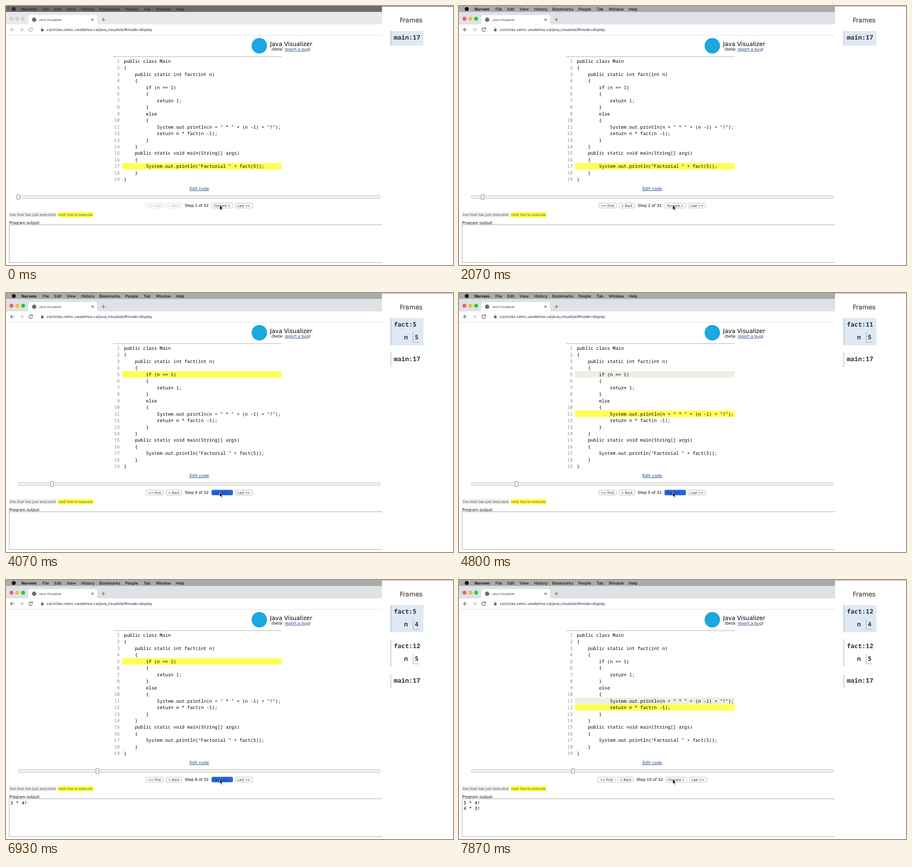
An HTML page that plays this animation: 982x570 px, repeating every 8 s.

```html
<!DOCTYPE html>
<html lang="en">
<head>
<meta charset="utf-8">
<title>Java Visualizer</title>
<style>
  html, body { margin: 0; width: 100%; height: 100%; overflow: hidden; background: #fff; }
  svg { display: block; width: 100%; height: 100%; font-family: "DejaVu Sans", sans-serif; }
  text { white-space: pre; text-rendering: geometricPrecision; }
  .ui { font-family: Inter, sans-serif; }
  .mono { font-family: "Noto Sans Mono", monospace; font-size: 10.08px; }
  .menu { font-size: 8.6px; }
  .num { fill: #888; text-anchor: end; }
  .btn { font-size: 6.95px; text-anchor: middle; fill: #222; }
  .btn rect { fill: #fdfdfd; stroke: #b8b8b8; }
  .btn.off { fill: #aaa; }
  .btn.off rect { stroke: #ddd; }
  .btn.down { fill: #0b2a70; }
  .btn.down rect { fill: #2468e2; stroke: #1c56c4; }
  .link { fill: #1f3f86; text-decoration: underline; }
  .stack { font-family: "Noto Sans Mono", monospace; font-size: 13.8px; font-weight: 600; fill: #333; }
  .line { fill: none; stroke: #a4a4a4; }
  .icon { fill: none; stroke: #555; stroke-width: 1.2; }
</style>
</head>
<body>
<svg viewBox="0 0 982 570" preserveAspectRatio="none">
  <rect width="982" height="570" fill="#fff"/>

  <g class="ui">
    <rect id="menuBar" width="982" height="13"/>
    <g id="menu" class="menu"><circle cx="17" cy="6.6" r="4.4"/></g>
    <rect id="tabBar" y="13" width="826" height="27.5"/>
    <g id="lights"></g>
    <path d="M45 40.5q4 0 4-4V24q0-4 4-4H196q4 0 4 4V36.500q0 4 4 4z" fill="#fff"/>
    <circle cx="62" cy="30" r="4.600" fill="#474a4e"/>
    <path d="M59 28l2.500 1.500-1 2M63 26.500l1 2 2 .5M62.500 33l1.500-2" fill="none" stroke="#fff" stroke-width=".9"/>
    <text x="72" y="32.700" font-size="7.100" fill="#3c4043">Java Visualizer</text>
    <path class="icon" d="M187.800 27.800l4.600 4.600m0-4.600l-4.600 4.600M210.300 30h7.600m-3.800-3.800v7.600"/>
    <path d="M0 64.500H826" stroke="#dcdee1"/>
    <path id="back" class="icon" d="M18.300 52h-8.300m4-4l-4 4 4 4"/>
    <path class="icon" style="stroke:#b5b7ba" d="M29.500 52h8.300m-4-4l4 4-4 4"/>
    <path id="reload" class="icon" d="M57.600 50a3.900 3.900 0 1 0 .4 3.200M58.300 47.600v2.900h-2.900"/>
    <rect x="77" y="51" width="5.400" height="4.600" rx=".6" fill="#55585c"/>
    <path class="icon" style="stroke-width:.9" d="M78.200 51v-1.300a1.500 1.500 0 0 1 3 0V51"/>
    <text x="89.500" y="55" font-size="8.300" fill="#2a2c30">cscircles.cemc.uwaterloo.ca/java_visualize/#mode=display</text>
  </g>

  <circle cx="556.500" cy="87.500" r="17" fill="#1ca6e2"/>
  <text x="580" y="87.600" font-size="12.800">Java Visualizer</text>
  <text x="583.500" y="98.300" font-size="8.650" font-style="italic">(beta: <tspan class="link" font-style="normal">report a bug</tspan>)</text>

  <path d="M235 111.500H605.500" stroke="#aaa"/>
  <rect id="done" x="255" width="350.500" height="14.300" fill="#eeeee7"/>
  <rect id="next" x="255" width="350.500" height="14.300" fill="#ffff55"/>
  <g id="code" class="mono"></g>

  <text class="link" x="403" y="405" font-size="9.200">Edit code</text>
  <rect x="27" y="417" width="795" height="6.500" rx="3" fill="#f1f1f1" stroke="#c4c4c4"/>
  <rect id="thumb" x="-3.200" y="414.700" width="6.600" height="11.600" rx="2" fill="#f4f4f4" stroke="#858585"/>
  <g id="buttons"></g>
  <text id="count" x="419" y="442.200" font-size="8.600" text-anchor="middle"></text>

  <g font-size="7.580">
    <rect x="7" y="453.500" width="104" height="11.500" fill="#eeeee7"/>
    <rect x="114" y="453.500" width="78" height="11.500" fill="#ffff40"/>
    <text x="8" y="462" fill="#555">line that has just executed</text>
    <text x="114.800" y="462" fill="#555522">next line to execute</text>
  </g>
  <text x="7" y="479.600" font-size="8.400">Program output:</text>
  <rect class="line" x="7" y="481.500" width="840" height="83"/>
  <g class="mono">
    <text id="out1" x="10" y="494">5 * 4!</text>
    <text id="out2" x="10" y="505.500">4 * 3!</text>
  </g>

  <rect x="826" y="1.300" width="156" height="569" fill="#fff"/>
  <text x="865" y="36.300" font-size="13.750" fill="#505050" stroke="#505050" stroke-width=".4">Frames</text>
  <g id="stack" class="stack"></g>
  <path d="M469.500 438.500v10l2.300-2.100 1.700 4 1.800-.8-1.700-3.800h3.200z" fill="#000" stroke="#fff" stroke-width=".8"/>
</svg>

<script>
const LOOP = 8000;
const LINE = 14.47;
const $ = id => document.getElementById(id);

const source = `public class Main
{
    public static int fact(int n)
    {
        if (n == 1)
        {
            return 1;
        }
        else
        {
            System.out.println(n + " * " + (n -1) + "!");
            return n * fact(n -1);
        }
    }
    public static void main(String[] args)
    {
        System.out.println("Factorial " + fact(5));
    }
}`;

// Each step: when the button goes down, when the step shows,
// next line, executed line, stack as [line, n], printed lines.
const steps = [
  { press: 0, at: 0, next: 17, done: 0, calls: [], out: 0 },
  { press: 2000, at: 2070, next: 17, done: 0, calls: [], out: 0 },
  { press: 2530, at: 2730, next: 5, done: 17, calls: [[5, 5]], out: 0 },
  { press: 3270, at: 3470, next: 5, done: 0, calls: [[5, 5]], out: 0 },
  { press: 4070, at: 4200, next: 11, done: 5, calls: [[11, 5]], out: 0 },
  { press: 4800, at: 4930, next: 12, done: 11, calls: [[12, 5]], out: 1 },
  { press: 5470, at: 5600, next: 5, done: 12, calls: [[5, 4], [12, 5]], out: 1 },
  { press: 6200, at: 6330, next: 5, done: 0, calls: [[5, 4], [12, 5]], out: 1 },
  { press: 6930, at: 7070, next: 11, done: 5, calls: [[11, 4], [12, 5]], out: 1 },
  { press: 7670, at: 7870, next: 12, done: 11, calls: [[12, 4], [12, 5]], out: 2 }
];

const escape = s => s.replace(/&/g, "&amp;").replace(/</g, "&lt;");

$("code").innerHTML = source.split("\n").map((row, i) => {
  const y = 124.9 + LINE * i;
  const indent = row.search(/\S/);
  return `<text class="num" x="249.7" y="${y}">${i + 1}</text>` +
    `<text x="${259 + indent * 6.05}" y="${y}">${escape(row.trim())}</text>`;
}).join("");

const menus = [["Norvem", 34], ["File", 80], ["Edit", 106], ["View", 133], ["History", 165],
  ["Bookmarks", 205], ["People", 262], ["Tab", 302], ["Window", 329], ["Help", 373]];
$("menu").innerHTML += menus.map(([name, x], i) =>
  `<text x="${x}" y="10" font-weight="${i ? 450 : 700}">${name}</text>`).join("");

function drawButtons(step, pressed) {
  const shift = step > 9 ? 2.6 : 0;
  const button = (label, x, w, state = "") =>
    `<g class="btn ${state}"><rect x="${x}" y="433.8" width="${w}" height="10.8" rx="2.2"/>` +
    `<text x="${x + w / 2}" y="441.7">${escape(label)}</text></g>`;
  const off = step === 1 ? "off" : "";
  $("buttons").innerHTML =
    button("<< First", 307.3 - shift, 38.4, off) +
    button("< Back", 351.6 - shift, 34.4, off) +
    button("Forward >", 452 + shift, 46, pressed ? "down" : "") +
    button("Last >>", 503.7 + shift, 38);
}

function drawStack(calls) {
  const top = i => 55 + 76 * i;
  const box = (i, h, label) =>
    `<rect x="845" y="${top(i)}" width="72" height="${h}" fill="${i ? "#fff" : "#dfe8f5"}"/>` +
    `<path class="line" d="M845.5 ${top(i)}v${h}"/><text x="852" y="${top(i) + 19.3}">${label}</text>`;
  const frames = calls.map(([line, n], i) =>
    box(i, 60, "fact:" + line) +
    `<text x="874.5" y="${top(i) + 47}">n</text><text x="898" y="${top(i) + 47}">${n}</text>` +
    `<path class="line" d="M894.5 ${top(i) + 31}v22.500H908"/>`);
  $("stack").innerHTML = frames.join("") + box(calls.length, 32, "main:17");
}

function drawWindow(focus) {
  const colors = focus ? ["#fc5b57", "#fdbc2e", "#28c840"] : ["#d2d3d5", "#d2d3d5", "#d2d3d5"];
  const rims = focus ? ["#e2443f", "#dfa023", "#1dad2b"] : ["#c0c1c3", "#c0c1c3", "#c0c1c3"];
  $("lights").innerHTML = colors.map((c, i) =>
    `<circle cx="${12 + 12.8 * i}" cy="28" r="3.9" fill="${c}" stroke="${rims[i]}" stroke-width=".6"/>`).join("");
  $("menuBar").setAttribute("fill", focus ? "#ababab" : "#6c6c6c");
  $("menu").setAttribute("fill", focus ? "#111" : "#2c2c2c");
  $("tabBar").setAttribute("fill", focus ? "#dee1e6" : "#e7e9ec");
  $("back").style.stroke = $("reload").style.stroke = focus > 1 ? "#555" : "#a5a7aa";
}

function placeBand(id, line) {
  $(id).setAttribute("y", 114 + LINE * (line - 1));
  $(id).style.display = line ? "" : "none";
}

let shown = "";
function render(t) {
  const step = steps.filter(s => s.at <= t).length;
  const pressed = step < steps.length && t >= steps[step].press;
  const focus = t < 1200 ? 0 : t < 1270 ? 1 : 2;
  const key = [step, pressed, focus].join();
  if (key === shown) return;
  shown = key;

  const { next, done, calls, out } = steps[step - 1];
  drawWindow(focus);
  placeBand("next", next);
  placeBand("done", done);
  drawButtons(step, pressed);
  drawStack(calls);
  $("count").textContent = `Step ${step} of 32`;
  $("thumb").setAttribute("transform", `translate(${27 + 24.8 * (step - 1)})`);
  $("out1").style.display = out > 0 ? "" : "none";
  $("out2").style.display = out > 1 ? "" : "none";
}

const start = performance.now();
function tick() {
  render((performance.now() - start) % LOOP);
  requestAnimationFrame(tick);
}
tick();
</script>
</body>
</html>
```
